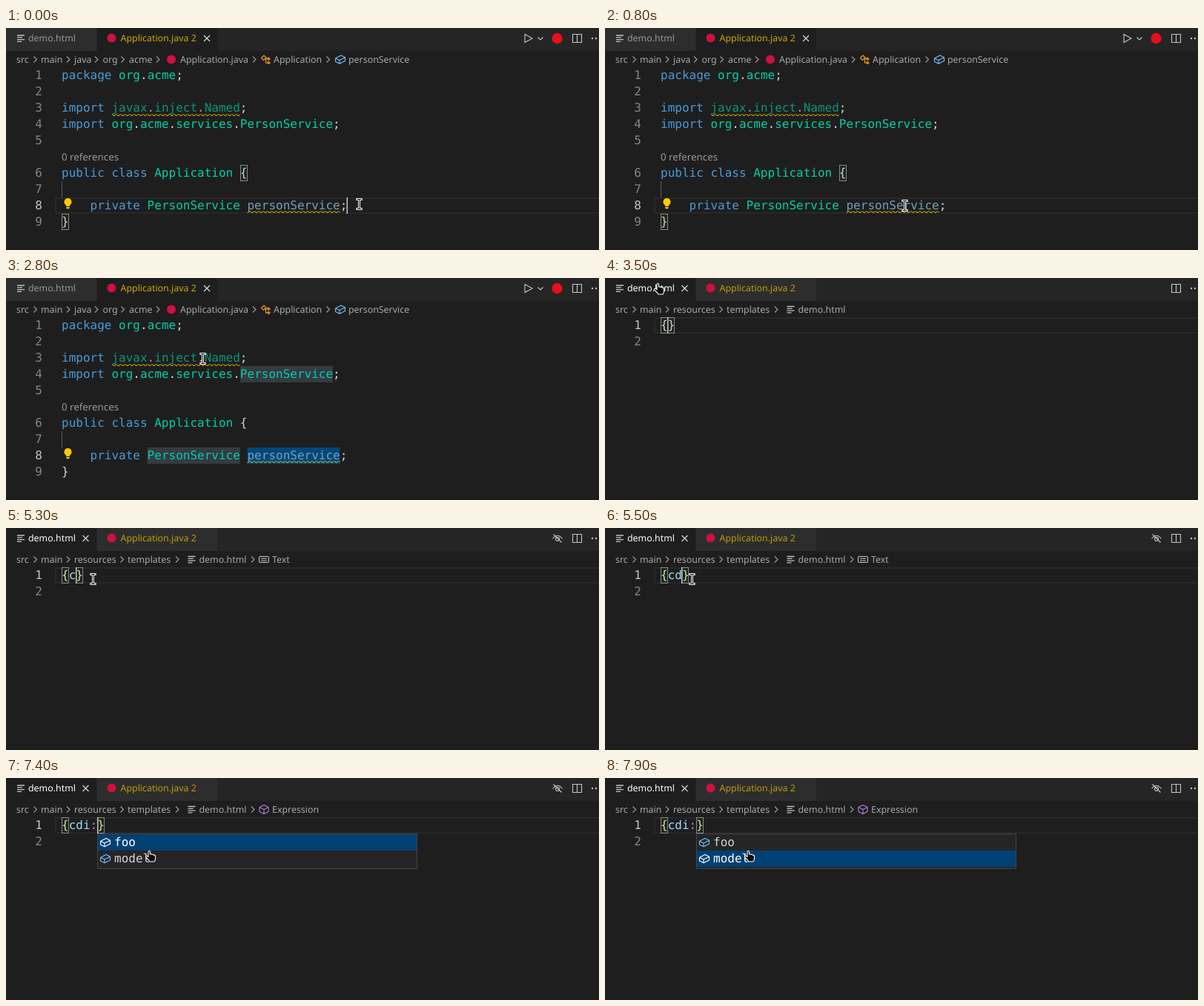
An HTML page that plays this animation: 800 by 300 pixels, repeating every 8000 ms.

```html
<!DOCTYPE html>
<html lang="en">
<head>
<meta charset="utf-8">
<title>Editor</title>
<style>
html, body { margin: 0; width: 100%; height: 100%; overflow: hidden; background: #1e1e1e; }
svg { display: block; width: 800px; height: 300px; }
text { white-space: pre; text-rendering: geometricPrecision; }
.ui { font: 12.4px "Noto Sans", "Open Sans", sans-serif; fill: #a9a9a9; }
.code { font: 16px "DejaVu Sans Mono", monospace; fill: #d4d4d4; }
.num { fill: #858585; text-anchor: end; }
.now { fill: #c6c6c6; }
.key { fill: #4a9bd9; }
.type { fill: #00d0a9; }
.dimtype { fill: #0b957d; }
.dim { fill: #989898; }
.var { fill: #9cdcfe; }
.dimvar { fill: #70a0bc; }
.brace { fill: #dcdcaa; }
.colon { fill: #c586c0; }
.line { fill: none; stroke: #c5c5c5; stroke-width: 1.1; }
.match { fill: rgba(0, 100, 0, .12); stroke: #888; }
.row { fill: none; stroke: #282828; stroke-width: 2; }
.caret { fill: #c8c8c8; }
.same { fill: #343b41; }
</style>
</head>
<body>
<svg viewBox="0 0 800 300">
  <defs>
    <pattern id="wave" width="6" height="3" patternUnits="userSpaceOnUse" y="116">
      <path fill="#cca700" d="M5.5 0 2.5 3H1.1L4.1 0zM4 0 6 2V.6L5.4 0zM0 2 1 3H2.4L0 .6z"/>
    </pattern>
    <path id="chev" d="M-2-4 2 0-2 4" fill="none" stroke="#a0a0a0" stroke-width="1.1"/>
    <path id="file" d="M-5-4H5M-5-1.2H2M-5 1.6H5M-5 4.4H1" fill="none" stroke="#bfc3c4" stroke-width="1.3"/>
    <path id="close" d="M-4-4 4 4M4-4-4 4" fill="none" stroke="#d8d8d8" stroke-width="1.2"/>
    <path id="box" d="M-6.5-1.5 1-5.5 6.5-2.8V2L-1 5.8-6.5 3zM-6.5-1.5-1 1 6.5-2.8M-1 1V5.8" fill="none" stroke-width="1.1" stroke-linejoin="round"/>
    <path id="cube" d="M0-6 6-3V3L0 6-6 3V-3zM-6-3 0 0 6-3M0 0V6" fill="none" stroke-width="1.1" stroke-linejoin="round"/>
  </defs>

  <rect width="800" height="31" fill="#252526"/>
  <rect id="tab1" width="122" height="31"/>
  <rect id="tab2" x="123" width="162" height="31"/>
  <use href="#file" x="20" y="14"/>
  <text id="name1" class="ui" x="30" y="18">demo.html</text>
  <circle cx="142.500" cy="13.500" r="6" fill="#d0103f"/>
  <text id="name2" class="ui" x="154.500" y="18">Application.java 2</text>
  <path class="line" d="M764.500 8.500h12v11h-12zM770.500 8.500v11"/>
  <g fill="#c5c5c5"><circle cx="791" cy="14" r="1.200"/><circle cx="796" cy="14" r="1.200"/></g>

  <g data-on="0-3500">
    <use href="#close" x="271" y="14"/>
    <path class="line" d="M700 8.500V19.500L710 14zM717.500 12.500 721 16 724.500 12.500"/>
    <circle cx="743.500" cy="14" r="7.200" fill="#e5101c"/>
    <g id="crumbsJava"></g>
    <circle cx="223" cy="42.500" r="6" fill="#d0103f"/>
    <g fill="none" stroke="#ee9d28" stroke-width="1.200">
      <path d="M344.500 40.500 348 37 351 40 347.500 43.500zM349.500 41.500H354M350.500 41.500V47H354"/>
      <path d="M354 40 356 42 354.500 43.500 352.500 41.500zM354 45.500 356 47 354.500 48.500 352.500 47z"/>
    </g>
    <use href="#box" x="451" y="42.500" stroke="#75beff"/>

    <rect class="row" x="67" y="230" width="740" height="20" data-on="0-1000"/>
    <path d="M75.500 207V229" stroke="#606060"/>
    <g data-on="1000-3500">
      <rect class="same" x="316" y="119" width="125" height="22"/>
      <rect class="same" x="190.600" y="229" width="125.200" height="22"/>
      <rect x="325.500" y="229" width="125" height="22" fill="#04477a"/>
    </g>
    <g data-on="0-1000">
      <rect class="match" x="316.500" y="185.500" width="9" height="21"/>
      <rect class="match" x="75.500" y="251.500" width="9" height="21"/>
    </g>
    <g id="numsJava"></g>
    <g class="code">
      <text x="75" y="69"><tspan class="key">package</tspan> <tspan class="type">org</tspan>.<tspan class="type">acme</tspan>;</text>
      <text x="75" y="113"><tspan class="key">import</tspan> <tspan class="dimtype">javax</tspan><tspan class="dim">.</tspan><tspan class="dimtype">inject</tspan><tspan class="dim">.</tspan><tspan class="dimtype">Named</tspan>;</text>
      <text x="75" y="135"><tspan class="key">import</tspan> <tspan class="type">org</tspan>.<tspan class="type">acme</tspan>.<tspan class="type">services</tspan>.<tspan class="type">PersonService</tspan>;</text>
      <text x="75" y="201"><tspan class="key">public class</tspan> <tspan class="type">Application</tspan> {</text>
      <text x="75" y="245">    <tspan class="key">private</tspan> <tspan class="type">PersonService</tspan> <tspan class="dimvar">personService</tspan>;</text>
      <text x="75" y="267">}</text>
    </g>
    <text class="ui" x="75" y="179" style="font-size:13.300px;fill:#999">0 references</text>
    <rect x="142.500" y="116" width="173" height="3" fill="url(#wave)"/>
    <rect x="325.500" y="116" width="125" height="3" fill="url(#wave)" transform="translate(0 131)"/>
    <path d="M83.500 230a5 5 0 0 1 3 9q-.7.600-.7 2H81.200q0-1.400-.7-2a5 5 0 0 1 3-9zM81.200 242h4.600v1.200l-1 1H82.200l-1-1z" fill="#fc0"/>
    <rect class="caret" x="459.500" y="229" width="1.500" height="22" data-on="0-500"/>
    <rect class="caret" x="450" y="229" width="2" height="22" data-on="1000-1500 2000-2400 2900-3500"/>
  </g>

  <g data-on="3500-8000">
    <g id="crumbsHtml"></g>
    <use href="#file" x="250.500" y="42.500"/>
    <g data-on="3900-8000"><use href="#chev" x="333" y="42.500"/></g>
    <g data-on="3900-6000">
      <path class="line" d="M343 38.500h10q1.500 0 1.500 1.500v5q0 1.500-1.500 1.500h-10q-1.500 0-1.500-1.500v-5q0-1.500 1.500-1.500zM344 41.300h8M344 44h8" stroke-dasharray="none"/>
      <text class="ui" x="359" y="47">Text</text>
    </g>
    <g data-on="6000-8000">
      <use href="#cube" x="348" y="42.500" stroke="#b180d7"/>
      <text class="ui" x="359" y="47">Expression</text>
    </g>
    <g class="line" data-on="3600-8000">
      <path d="M737.500 14.500q6.500-8.500 13 0M738.500 8.500 749.500 19.500"/>
      <circle cx="744" cy="15" r="2.500"/>
    </g>
    <rect class="row" x="67" y="54" width="740" height="20"/>
    <g id="numsHtml"></g>
    <rect class="match" x="75.500" y="53.500" width="9" height="21"/>
    <rect id="matchEnd" class="match" y="53.500" width="9" height="21"/>
    <text class="code" x="75" y="69"><tspan id="open">{</tspan><tspan id="word" class="var"></tspan><tspan class="colon" data-on="6400-8000">:</tspan><tspan id="shut">}</tspan></text>
    <rect id="caret" class="caret" y="53" width="1.500" height="22" data-on="3500-4000 4500-5000 5300-6100 6400-6900 7400-7900"/>
    <g id="lists"></g>
  </g>

  <use id="tabClose" href="#close" x="107.500" y="14"/>
  <g id="beam" fill="none" stroke-linecap="square">
    <path id="beamShape" d="M-2.500-6.500H-1Q0-6.500 0-5.500 0-6.500 1-6.500H2.500M0-5.500V5.500M-2.500 6.500H-1Q0 6.500 0 5.500 0 6.500 1 6.500H2.500" stroke="#fff" stroke-width="2.800"/>
    <use href="#beamShape"/>
    <path d="M-2.500-6.500H2.500M0-6V6M-2.500 6.500H2.500" stroke="#111" stroke-width="1"/>
  </g>
  <path id="hand" fill="#0a0a0a" stroke="#fff" stroke-width="1.100" stroke-linejoin="round"
    d="M-2-.5V-5.200Q-2-6.500-.8-6.500T.5-5.200V-2Q2.200-2.600 2.800-1.500 4.700-2.100 5.200-.9 7.500-1 7.500 1V4Q7.500 6.500 6 8H0Q-2 5-4.700 2.800-6.300.900-4.800.300-3.600-.1-2 1.500z"/>
</svg>
<script>
const LOOP = 8000, STEP = 100, LEFT = 75, CELL = 9.633;
const $ = id => document.getElementById(id);
const col = n => LEFT + n * CELL;

// Breadcrumbs: labels and chevrons by x position.
function crumbs(id, labels, chevrons) {
  $(id).innerHTML =
    labels.map(([x, s]) => `<text class="ui" x="${x}" y="47">${s}</text>`).join("") +
    chevrons.map(x => `<use href="#chev" x="${x}" y="42.500"/>`).join("");
}
crumbs("crumbsJava", [[14, "src"], [47, "main"], [92, "java"], [130.500, "org"], [166, "acme"],
  [235, "Application.java"], [361, "Application"], [462, "personService"]],
  [39.500, 84, 122, 157.500, 205, 335, 434.500]);
crumbs("crumbsHtml", [[14, "src"], [47, "main"], [92, "resources"], [164, "templates"], [260.500, "demo.html"]],
  [39.500, 84, 156.500, 231]);

function numbers(id, count, active, gapAfter) {
  for (let n = 1; n <= count; n++) {
    const y = 47 + 22 * (n + (n > gapAfter));
    $(id).innerHTML += `<text class="code num ${n === active ? "now" : ""}" x="49" y="${y}">${n}</text>`;
  }
}
numbers("numsJava", 9, 8, 5);
numbers("numsHtml", 2, 1, 9);

function list(x, items, picked, on) {
  const rows = items.map((s, i) => {
    const y = 76 + 22 * i, hit = i === picked;
    return (hit ? `<rect x="${x + 1}" y="${y}" width="430" height="22" fill="#004073"/>` : "") +
      `<use href="#box" x="${x + 11}" y="${y + 11}" stroke="${hit ? "#fff" : "#75beff"}"/>` +
      `<text class="code" x="${x + 23}" y="${y + 16}"${hit ? ' style="fill:#fff"' : ""}>${s}</text>`;
  });
  $("lists").innerHTML += `<g data-on="${on}"><rect x="${x + .5}" y="75.500" width="431" ` +
    `height="${22 * items.length + 3}" fill="#252526" stroke="#454545"/>${rows.join("")}</g>`;
}
list(94, ["case", "each", "include", "switch"], 0, "5400-5500");
list(123, ["foo", "model"], 0, "6500-7900");
list(123, ["foo", "model"], 1, "7900-8000");

const timed = [...document.querySelectorAll("[data-on]")].map(el => ({
  el, spans: el.dataset.on.split(" ").map(s => s.split("-").map(Number))
}));
const keyTimes = [5300, 5500, 5700, 6400];

// Pointer path: time, x, y
const path = [
  [0, 476, 238], [400, 425, 239], [800, 404, 240], [1300, 404, 240], [1400, 462, 239],
  [1500, 486, 241], [1700, 502, 247], [2300, 502, 247], [2400, 420, 209], [2600, 420, 209],
  [3000, 110, 8], [3200, 72, 14], [3700, 72, 14], [4100, 116.500, 69], [6700, 116.500, 69],
  [7400, 194, 105], [8000, 194, 105]
];
function pointer(t) {
  const i = path.findIndex(p => p[0] > t);
  const [a, x, y] = path[i - 1], [b, u, v] = path[i];
  const k = (t - a) / (b - a);
  return [x + (u - x) * k, y + (v - y) * k];
}
const show = (el, on) => { el.style.display = on ? "" : "none"; };

function draw(t) {
  for (const { el, spans } of timed) show(el, spans.some(([a, b]) => t >= a && t < b));

  const html = t >= 3500;
  $("tab1").setAttribute("fill", html ? "#1e1e1e" : "#2d2d2d");
  $("tab2").setAttribute("fill", html ? "#2d2d2d" : "#1e1e1e");
  $("name1").style.fill = html ? "#fff" : "#969696";
  $("name2").style.fill = html ? "#bd9c08" : "#cca700";

  const typed = keyTimes.filter(k => t >= k).length;
  const end = col(typed + 1);
  $("word").textContent = "cdi".slice(0, typed);
  $("open").setAttribute("class", typed ? "brace" : "");
  $("shut").setAttribute("class", typed ? "brace" : "");
  $("matchEnd").setAttribute("x", Math.floor(end) + .5);
  $("caret").setAttribute("x", Math.floor(end));

  const [x, y] = pointer(t);
  const onHand = y < 53 || (t >= 6500 && x > 124 && y > 76);
  const at = `translate(${Math.round(x) + (onHand ? 0 : .5)} ${Math.round(y)})`;
  $("hand").setAttribute("transform", at);
  $("beam").setAttribute("transform", at);
  show($("hand"), onHand);
  show($("beam"), !onHand);
  show($("tabClose"), html || (x < 122 && y < 31));
}

const start = performance.now();
function tick() {
  const t = (performance.now() - start) % LOOP;
  draw(Math.floor(t / STEP) * STEP);
  requestAnimationFrame(tick);
}
draw(0);
requestAnimationFrame(tick);
</script>
</body>
</html>
```
